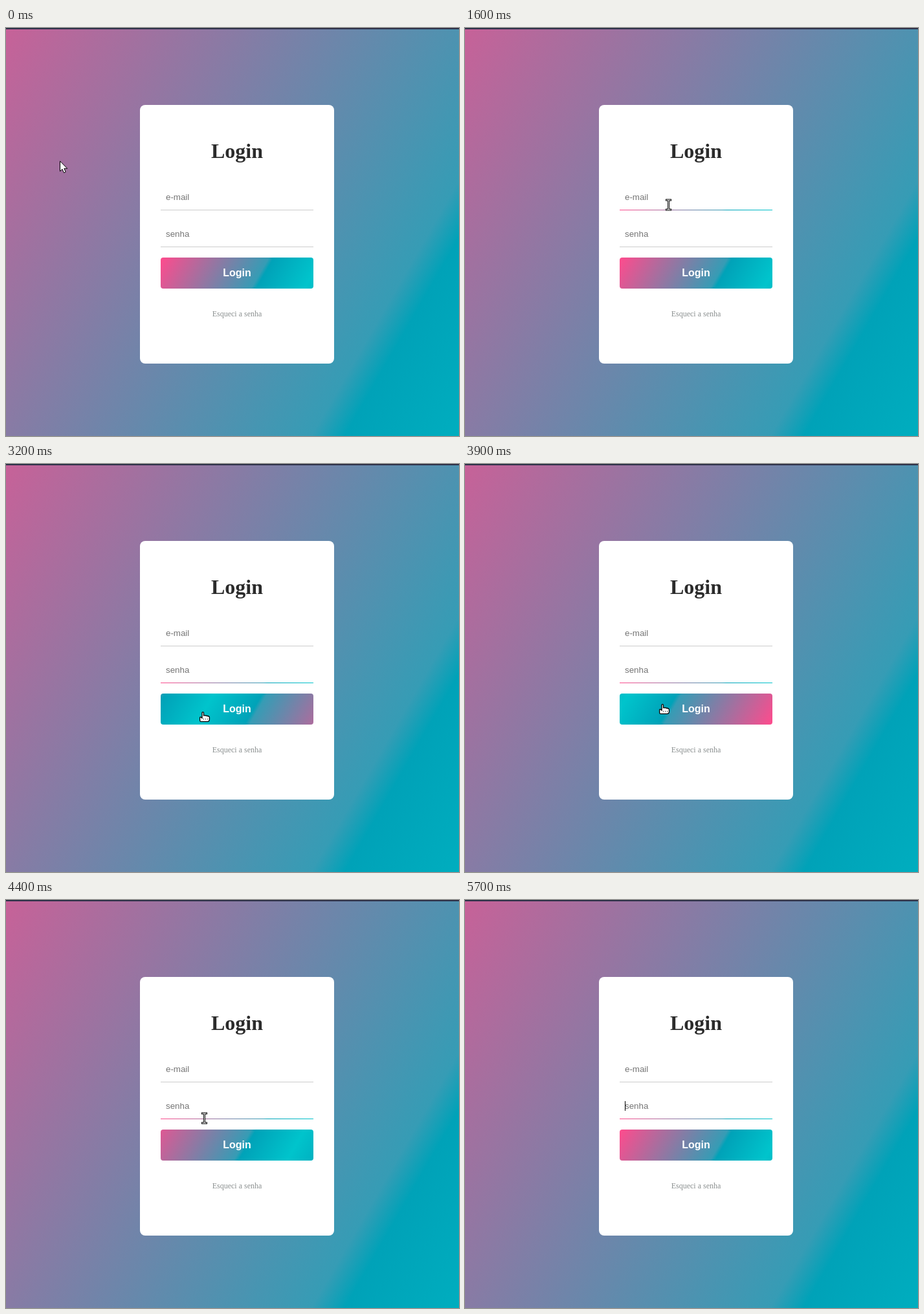
Recreate the animation shown at these times as an HTML page. Size 700 by 631 pixels, loop 5900 ms.

```html
<!DOCTYPE html>
<html lang="pt">
<head>
<meta charset="utf-8">
<title>Login</title>
<style>
  :root {
    --pink: #ff4b8d; --slate: #369cb5; --teal: #00a2b8; --cyan: #00c4cc;
    --fade: linear-gradient(120deg, var(--pink), var(--slate) 67%, var(--teal) 70%, var(--cyan));
  }
  html, body { margin: 0; width: 100%; height: 100%; overflow: hidden; }
  #stage { position: relative; width: 700px; height: 631px; overflow: hidden; background: #2e3148; }
  #stage * { position: absolute; box-sizing: border-box; white-space: nowrap; }
  #page { left: -326px; top: 2px; width: 1366px; height: 634px; background: var(--fade); }
  #card { left: 207px; top: 119px; width: 300px; height: 400px; border-radius: 8px; background: #fff;
    font-family: "Liberation Serif", serif; text-align: center; }
  h1 { margin: 0; top: 53px; width: 300px; font-size: 32px; line-height: 37px; color: #2b2b2b; }
  .field { left: 32px; width: 236px; height: 41px; border-bottom: 1px solid #ccc; text-align: left;
    font: 13.333px/15px "Liberation Sans", sans-serif; color: #757575; }
  .field span { left: 8px; top: 13px; }
  .line { left: 0; top: 40px; height: 1px; background: var(--fade); }
  .caret { left: 8px; top: 13px; width: 1px; height: 15px; background: #000; }
  #button { left: 32px; top: 236px; width: 236px; height: 48px; border-radius: 4px; color: #fff;
    font: bold 16px/48px "Liberation Sans", sans-serif;
    background: linear-gradient(120deg, var(--pink), var(--slate) 33.5%, var(--teal) 35%, var(--cyan) 50%,
      var(--teal) 65%, var(--slate) 66.5%, var(--pink)) 0 0 / 200%; }
  #forgot { top: 316px; width: 300px; font-size: 12px; line-height: 14px; color: #8a8f8f; }
  svg { left: 0; top: 0; fill: #fff; stroke: #000; }
</style>
</head>
<body>
<div id="stage">
  <div id="page"></div>
  <div id="card">
    <h1>Login</h1>
    <div class="field" style="top:122px"><span>e-mail</span><i class="line"></i><i class="caret"></i></div>
    <div class="field" style="top:179px"><span>senha</span><i class="line"></i><i class="caret"></i></div>
    <div id="button">Login</div>
    <div id="forgot">Esqueci a senha</div>
  </div>
  <svg width="700" height="631">
    <g id="arrow"><path d="M.5.9V16.6L4 13.3L6.5 18.9L9.2 17.7L6.8 12.3H11.7Z"/></g>
    <g id="beam">
      <path d="M-4 -7H5M-4 8H5M.5 -7V8" stroke-width="3"/>
      <path d="M-3 -7H4M-3 8H4M.5 -7V8" stroke="#fff"/>
    </g>
    <g id="hand">
      <path transform="translate(-5 -1)" stroke-width="1.3" d="M4 10V1.8Q4 .6 5.2 .6T6.5 1.8V6Q8 5 9 6.3Q10.6 5.4 11.5 6.8Q13.2 6 14 7.5Q15.4 7 15.4 9V12Q15.4 15.4 12 15.4H2.5Q.6 15.4 .6 13V9.5Q.6 8 2 8.4Z"/>
      <path d="M1 10.5H9" stroke-dasharray="1 2"/>
    </g>
  </svg>
</div>
<script>
const LOOP = 5900, STEP = 100;
// Pointer waypoints: time, x, y
const path = [
  [0, 83, 205], [300, 83, 205], [800, 314, 257], [1500, 314, 257], [1900, 312, 319],
  [2800, 312, 319], [2900, 306, 372], [3000, 306, 372], [3200, 304, 384], [3800, 304, 384],
  [4200, 306, 337], [4800, 306, 337], [4900, 305, 333], [5400, 90, 13], [LOOP, 90, 13]
];
const $ = id => document.getElementById(id);
const lines = document.querySelectorAll('.line');
const carets = document.querySelectorAll('.caret');
const between = (v, a, b) => v >= a && v < b;

// CSS "ease" over half a second
function ease(ms) {
  const x = Math.min(1, Math.max(0, ms / 500));
  const bezier = (u, a, b) => 3 * u * (1 - u) ** 2 * a + 3 * u * u * (1 - u) * b + u ** 3;
  let lo = 0, hi = 1;
  for (let i = 0; i < 20; i++) {
    const mid = (lo + hi) / 2;
    if (bezier(mid, .25, .25) < x) lo = mid; else hi = mid;
  }
  return x === 1 ? 1 : bezier(lo, .1, 1);
}

function pointerAt(t) {
  const i = path.findIndex(p => p[0] > t);
  const [t0, x0, y0] = path[i - 1], [t1, x1, y1] = path[i];
  const k = (t - t0) / (t1 - t0);
  return [Math.round(x0 + (x1 - x0) * k), Math.round(y0 + (y1 - y0) * k)];
}

function pointerKind(x, y) {
  if (!between(x, 239, 475)) return 'arrow';
  if (between(y, 355, 403)) return 'hand';
  return between(y, 241, 282) || between(y, 298, 339) ? 'beam' : 'arrow';
}

function draw(t) {
  const [x, y] = pointerAt(t), kind = pointerKind(x, y);
  for (const id of ['arrow', 'beam', 'hand']) {
    $(id).style.display = id === kind && t < 5500 ? '' : 'none';
    $(id).setAttribute('transform', `translate(${x} ${y})`);
  }
  lines[0].style.width = 100 * (ease(t - 850) - ease(t - 1850)) + '%';
  lines[1].style.width = 100 * ease(t - 1850) + '%';

  const blink = between(t, 1900, 2900) || between(t, 3400, 3900) || between(t, 4500, 5100) || t >= 5700;
  carets[0].hidden = !between(t, 1000, 1600);
  carets[1].hidden = !blink;
  for (const c of carets) c.style.display = c.hidden ? 'none' : '';

  let hover = between(t, 2900, 3100) ? .06 : ease(t - 2990);
  if (t >= 3400) hover = 1 - ease(t - 4100);
  $('button').style.backgroundPosition = -236 * hover + 'px 0';
}

function tick() {
  draw(Math.floor(performance.now() % LOOP / STEP) * STEP);
  requestAnimationFrame(tick);
}
tick();
</script>
</body>
</html>
```
